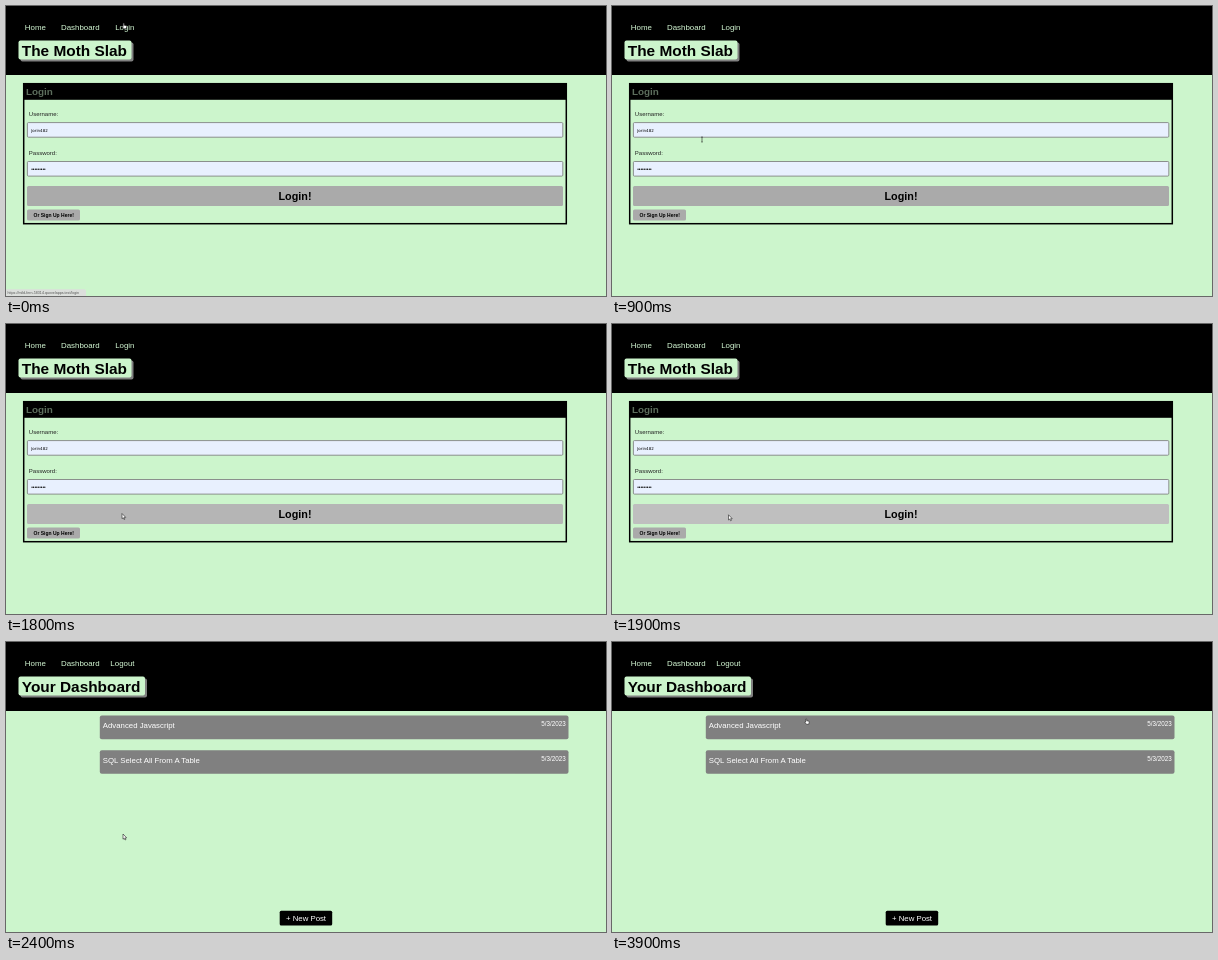
Write an HTML page that moves like this. It is 600 px wide and 290 px high and loops after 4 s.

```html
<!DOCTYPE html>
<html lang="en">
<head>
<meta charset="utf-8">
<title>Blog login</title>
<style>
  html, body { margin: 0; width: 100%; height: 100%; overflow: hidden; background: #ccf5cc; }
  svg { display: block; width: 600px; height: 290px; font-family: "Liberation Sans", Arial, sans-serif; }
  text { white-space: pre; }
  .nav { font-size: 7.9px; fill: #d4f8d4; }
  .title { font-size: 15.4px; }
  .bold { font-weight: bold; }
  .label { font-size: 6px; fill: #222; }
  .input { fill: #e8f0fe; stroke: #777; stroke-width: .8; }
  .card { fill: #808080; }
  .post { font-size: 7.8px; fill: #fff; }
  .date { font-size: 6.3px; fill: #fff; text-anchor: end; }
  .filled { font-size: 6.15px; }
  .preview { font: 4px "DejaVu Sans", sans-serif; }
  .preview .dots { font: 4.6px "Liberation Sans", sans-serif; }
  #cursor path { fill: #fff; stroke: #222; stroke-width: .6; stroke-linejoin: round; }
  #cursor #beam { fill: none; }
</style>
</head>
<body>
<svg viewBox="0 0 600 290">
  <rect width="600" height="290" fill="#ccf5cc"/>
  <rect width="600" height="69" fill="#000"/>
  <text class="nav" x="18.8" y="23.5">Home</text>
  <text class="nav" x="55" y="23.5">Dashboard</text>
  <text class="nav" id="session" x="128.5" y="23.5" text-anchor="end">Login</text>
  <rect id="titleShadow" x="14.5" y="36.5" width="113" height="19" rx="2" fill="#808080"/>
  <rect id="titleBox" x="12.5" y="34.5" width="113" height="19" rx="2" fill="#ccf5cc"/>
  <text id="title" class="title bold" x="15.8" y="49.5">The Moth Slab</text>

  <g id="login">
    <rect x="17.7" y="77.7" width="542.6" height="140" fill="none" stroke="#000" stroke-width="1.5"/>
    <rect x="17" y="77" width="544" height="16.8"/>
    <text class="bold" x="20" y="89.2" font-size="9.9" fill="#5d6e5d">Login</text>
    <text class="label" x="22.8" y="110.2">Username:</text>
    <rect class="input" x="21.4" y="116.6" width="535.4" height="14.6" rx="1"/>
    <text class="label" x="22.8" y="149.2">Password:</text>
    <rect class="input" x="21.4" y="155.5" width="535.4" height="14.6" rx="1"/>
    <g id="fields">
      <text x="25.2" y="125.8">Jorin482</text>
      <text class="dots" x="25.2" y="164.6">•••••••••</text>
    </g>
    <rect id="submit" x="21" y="180" width="536" height="20" rx="1.5"/>
    <text class="bold" x="289" y="193.6" font-size="10.8" text-anchor="middle">Login!</text>
    <rect x="21" y="203.5" width="53" height="11" rx="1.5" fill="#aaa"/>
    <text class="bold" x="47.7" y="210.7" font-size="5" text-anchor="middle">Or Sign Up Here!</text>
    <g id="status">
      <path d="M0 283.3H78.5Q80 283.3 80 285V290H0Z" fill="#dcdfdc"/>
      <text x="1.5" y="288" font-size="3.65" fill="#555">https://mild-fern-58314.quovelapps.test/login</text>
    </g>
  </g>

  <g id="dashboard">
    <rect class="card" x="93.8" y="73.5" width="468.7" height="23.7" rx="2"/>
    <text class="post" x="96.8" y="86.2">Advanced Javascript</text>
    <text class="date" x="559.7" y="84.4">5/3/2023</text>
    <rect class="card" x="93.8" y="108.2" width="468.7" height="23.5" rx="2"/>
    <text class="post" x="96.8" y="120.8">SQL Select All From A Table</text>
    <text class="date" x="559.7" y="119.1">5/3/2023</text>
    <rect x="273.7" y="268.8" width="52.5" height="14.8" rx="1.5"/>
    <text class="post" x="300" y="278.8" text-anchor="middle">+ New Post</text>
  </g>

  <g id="cursor">
    <path id="arrow" d="M0 0V5.2L1.2 4.2L2 6L2.9 5.6L2.1 3.9H3.7Z"/>
    <path id="hand" d="M.2 .5Q.8-.2 1.2 .5V2.2L3.4 2.7Q3.9 3 3.7 3.8L3.2 5.8H1L-.8 3.6Q-.6 2.8 .2 3.5Z"/>
    <path id="beam" d="M-.8 0H.8M0 0V5M-.8 5H.8"/>
  </g>
</svg>
<script>
  const LOOP = 4000;
  const $ = id => document.getElementById(id);
  const show = (id, on) => $(id).style.display = on ? "" : "none";
  const progress = (t, from, to) => Math.min(1, Math.max(0, (t - from) / (to - from)));
  const ease = p => p * p * (3 - 2 * p);

  // time, x, y of the pointer tip
  const path = [
    [0, 117, 17], [500, 91, 115], [800, 90, 131], [1450, 90, 131],
    [1800, 116, 189.5], [2000, 117, 192], [3500, 117, 192], [3900, 193.5, 76.5]
  ];

  function pointerAt(t) {
    const i = path.findIndex(point => point[0] > t);
    if (i < 0) return path.at(-1).slice(1);
    const [t0, x0, y0] = path[i - 1], [t1, x1, y1] = path[i];
    const p = ease(progress(t, t0, t1));
    return [x0 + (x1 - x0) * p, y0 + (y1 - y0) * p];
  }

  function pointerKind(t, y) {
    if (t < 100 || (t > 3500 && y < 131.5)) return "hand";
    return t >= 600 && t < 1600 ? "beam" : "arrow";
  }

  function draw(t) {
    const signedIn = t >= 2400;
    show("login", !signedIn);
    show("dashboard", signedIn);
    $("session").textContent = signedIn ? "Logout" : "Login";
    $("title").textContent = signedIn ? "Your Dashboard" : "The Moth Slab";
    for (const id of ["titleBox", "titleShadow"])
      $(id).setAttribute("width", signedIn ? 126.5 : 113);

    $("fields").setAttribute("class", t < 2100 ? "preview" : "filled");
    $("status").style.opacity = 1 - progress(t, 650, 900);
    const grey = 170 + 32 * progress(t, 1700, 2000);
    $("submit").setAttribute("fill", `rgb(${grey},${grey},${grey})`);

    const [x, y] = pointerAt(t);
    const kind = pointerKind(t, y);
    for (const id of ["arrow", "hand", "beam"]) show(id, id === kind);
    $("cursor").setAttribute("transform", `translate(${x} ${y})`);
  }

  const start = performance.now();
  function tick() {
    draw((performance.now() - start) % LOOP);
    requestAnimationFrame(tick);
  }
  tick();
</script>
</body>
</html>
```
